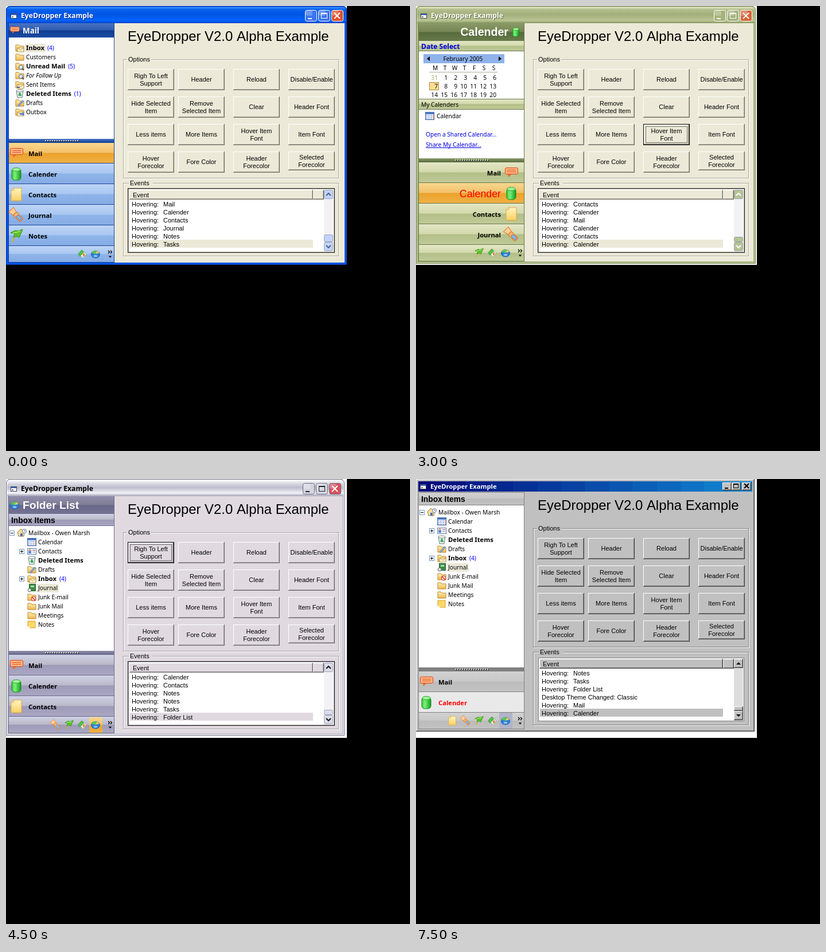
An HTML page with a canvas for the animation above (8 s loop, 704 by 777 pixels).

```html
<!DOCTYPE html>
<html lang="en">
<head>
<meta charset="utf-8">
<title>EyeDropper Example</title>
<style>
html, body { margin: 0; width: 100%; height: 100%; overflow: hidden; background: #000; }
canvas { display: block; }
</style>
</head>
<body>
<canvas id="stage" width="704" height="777"></canvas>
<script>
const ctx = document.getElementById('stage').getContext('2d');
const SANS = '"Liberation Sans", Arial, sans-serif';
const NOTO = '"Noto Sans", sans-serif';
const UI = '11px ' + SANS, LABEL = '10.2px ' + NOTO, BOLD = 'bold 11.2px ' + NOTO;
const ORANGE = ['#f8d88f', '#f3c06a', '#eba22c', '#f0b144'];

const THEMES = {
  blue: {
    w: 594, h: 452, face: '#ece9d8', border: '#0050e0', edge: '#0030b0', rim: '#1860ee', title: '#fff', shadow: '#0a2a90',
    bar: [0, '#0050dc', .07, '#3a93ff', .2, '#0860ec', .5, '#0054e3', .85, '#0264fc', 1, '#0040c8'],
    item: ['#bdd5f6', '#a9c7f0', '#8fb4ea', '#86ace4'], head: ['#4874c4', '#2f5cae', '#0e3d94', '#1a4ba2'],
    line: '#1c439c', box: '#3c74ec', boxEdge: '#fff', close: '#e0512d', glyph: '#fff',
    scroll: '#c3d3fb', arrow: '#4d6185', lo: '#aca899', dark: '#716f64'
  },
  olive: {
    w: 592, h: 450, face: '#ece9d8', border: '#a5b380', edge: '#71824e', rim: '#c4ce9e', title: '#fff', shadow: '#5c6c40',
    bar: [0, '#8c9c64', .07, '#e4e8c6', .2, '#b2be8c', .5, '#a2af7c', .85, '#bac494', 1, '#84955e'],
    item: ['#e3e7c6', '#d3d9ac', '#b3bf88', '#bfca98'], head: ['#8a9a68', '#748651', '#566a3c', '#677a4a'],
    line: '#65774a', box: '#a5b37c', boxEdge: '#fff', close: '#d8643a', glyph: '#fff',
    scroll: '#b5c491', arrow: '#fff', lo: '#aca899', dark: '#716f64'
  },
  silver: {
    w: 590, h: 448, face: '#e0dae0', border: '#c6c6d4', edge: '#727288', rim: '#fafafc', title: '#000', shadow: '',
    bar: [0, '#9a9aae', .07, '#fff', .25, '#dadae4', .5, '#bcbccc', .82, '#f2f2f8', 1, '#a2a2b6'],
    item: ['#cfd1e6', '#b9b9c8', '#9d9bb8', '#a9a7c2'], head: ['#9090ac', '#7e7d94', '#68678a', '#747392'],
    line: '#6c6b88', box: '#d4d4e0', boxEdge: '#6e6e86', close: '#d8505a', glyph: '#222',
    scroll: '#dcdce8', arrow: '#111', lo: '#a5a0a5', dark: '#6c686e'
  },
  classic: {
    w: 590, h: 441, face: '#c0c0c0', line: '#808080', title: '#fff',
    item: ['#d2d2d2', '#c8c8c8', '#bcbcbc', '#c2c2c2'], lo: '#808080', dark: '#404040', arrow: '#000'
  }
};

const STATES = [
  { end: 1500, theme: 'blue', header: 'Mail', headIcon: 'mail', headH: 25, headFont: 'bold 13.4px ' + NOTO, body: 'mail',
    items: ['Mail', 'Calender', 'Contacts', 'Journal', 'Notes'], sel: 'Mail', foot: ['house', 'globe'], thumb: 399,
    log: 'Mail,Calender,Contacts,Journal,Notes,Tasks' },
  { end: 3000, theme: 'blue', header: 'Calender', headIcon: 'cylinder', headH: 25, headFont: 'bold 14px ' + NOTO, rtl: true,
    sub: 'Date Select', subH: 19, body: 'calendar', mine: 161, items: ['Mail', 'Calender', 'Contacts', 'Journal'], sel: 'Calender',
    foot: ['flag', 'house', 'globe'], thumb: 401, log: 'Tasks,Mail,Mail,Calender,ItemSelected: Calender,Contacts' },
  { end: 4500, theme: 'olive', header: 'Calender', headIcon: 'cylinder', headH: 31, headFont: 'bold 19.6px ' + SANS, rtl: true,
    sub: 'Date Select', subH: 18, body: 'calendar', mine: 162, items: ['Mail', 'Calender', 'Contacts', 'Journal'], sel: 'Calender',
    selFont: '17.8px ' + SANS, foot: ['flag', 'house', 'globe'], focus: 10, thumb: 403,
    log: 'Contacts,Calender,Mail,Calender,Contacts,Calender' },
  { end: 6000, theme: 'silver', header: 'Folder List', headIcon: 'globe', headH: 31, headFont: 'bold 19.2px ' + SANS,
    sub: 'Inbox Items', subH: 21, body: 'tree', items: ['Mail', 'Calender', 'Contacts'], foot: ['journal', 'flag', 'house', 'globe'],
    hot: true, focus: 0, thumb: 403, log: 'Calender,Contacts,Notes,Notes,Tasks,Folder List' },
  { end: 7500, theme: 'silver', headH: 1, sub: 'Inbox Items', subH: 22, body: 'tree', items: [],
    foot: ['mail', 'cylinder', 'contacts', 'journal', 'flag', 'house', 'globe'], hot: true, focus: 1, thumb: 403,
    log: 'Mail,Contacts,Journal,Notes,Tasks,Folder List' },
  { end: 8000, theme: 'classic', headH: 1, sub: 'Inbox Items', subH: 22, body: 'tree', items: ['Mail', 'Calender'], sel: 'Calender',
    foot: ['contacts', 'journal', 'flag', 'house', 'globe'], hot: true, thumb: 404,
    log: 'Notes,Tasks,Folder List,Desktop Theme Changed: Classic,Mail,Calender' }
];

const BUTTONS = ['Righ To Left|Support', 'Header', 'Reload', 'Disable/Enable', 'Hide Selected|Item', 'Remove|Selected Item',
  'Clear', 'Header Font', 'Less items', 'More Items', 'Hover Item|Font', 'Item Font', 'Hover|Forecolor', 'Fore Color',
  'Header|Forecolor', 'Selected|Forecolor'];
const ITEM_ICONS = { Mail: 'mail', Calender: 'cylinder', Contacts: 'contacts', Journal: 'journal', Notes: 'flag' };

let theme;

function rect(x, y, w, h, fill) { ctx.fillStyle = fill; ctx.fillRect(x, y, w, h); }
function frame(x, y, w, h, color) { ctx.strokeStyle = color; ctx.lineWidth = 1; ctx.strokeRect(x + .5, y + .5, w - 1, h - 1); }
function text(s, x, y, font = UI, color = '#000', align = 'left') {
  ctx.font = font; ctx.fillStyle = color; ctx.textAlign = align;
  ctx.fillText(s, x, y);
}
function gradient(y, h, stops) {
  const g = ctx.createLinearGradient(0, y, 0, y + h);
  for (let i = 0; i < stops.length; i += 2) g.addColorStop(stops[i], stops[i + 1]);
  return g;
}
function band(x, y, w, h, [a, b, c, d]) { rect(x, y, w, h, gradient(y, h, [0, a, .48, b, .52, c, 1, d])); }
function path(pts) {
  ctx.beginPath();
  for (let i = 0; i < pts.length; i += 2) ctx.lineTo(pts[i], pts[i + 1]);
}
function paint(fill, stroke, width = 1) {
  if (fill) { ctx.fillStyle = fill; ctx.fill(); }
  if (stroke) { ctx.strokeStyle = stroke; ctx.lineWidth = width; ctx.stroke(); }
}
function poly(pts, fill, stroke) { path(pts); ctx.closePath(); paint(fill, stroke); }
function line(color, width, ...pts) { path(pts); paint(null, color, width); }
function round(x, y, w, h, r, fill, stroke) { ctx.beginPath(); ctx.roundRect(x, y, w, h, r); paint(fill, stroke); }
function oval(x, y, rx, ry, fill, stroke) { ctx.beginPath(); ctx.ellipse(x, y, rx, ry, 0, 0, Math.PI * 2); paint(fill, stroke); }
function raised(x, y, w, h) {
  rect(x, y, w, h, theme.dark);
  rect(x, y, w - 1, h - 1, '#fff');
  rect(x + 1, y + 1, w - 2, h - 2, theme.lo);
  rect(x + 1, y + 1, w - 3, h - 3, theme.face);
}
function arrow(x, y, dir, size, color) { poly([x - size, y - dir * size / 2, x + size, y - dir * size / 2, x, y + dir * size / 2], color); }

// Icons are drawn around their centre; the navigation set is about 22 px wide.
const ICONS = {
  mail() {
    round(-10.5, -8.5, 22, 11, 2, '#ffb27c', '#e0451a');
    poly([-6, 3, -5, 8, 0, 3], '#f06a30');
    line('#e0552a', 1, -7, -4.5, 8, -4.5); line('#e0552a', 1, -7, -1.5, 8, -1.5);
  },
  cylinder() {
    const g = ctx.createLinearGradient(-8, 0, 8, 0);
    g.addColorStop(0, '#3cc83c'); g.addColorStop(.35, '#7cf07a'); g.addColorStop(1, '#149a1c');
    round(-8, -10, 16, 21, [6, 6, 5, 5], g, '#128a1a');
    oval(0, -7.5, 7, 3, '#a4f49c', '#2cac34');
  },
  contacts() {
    poly([-9, -7, -4, -11, 9, -11, 9, 11, -9, 11], gradient(-11, 22, [0, '#fff6c4', 1, '#f8cf62']), '#e0a83c');
    poly([-9, -7, -4, -7, -4, -11], '#fffbe8', '#e0a83c');
  },
  journal() {
    ctx.rotate(.78);
    round(-4, -4, 17, 8, 2, '#ffb468', '#d46a20');
    poly([-13, -6, -4, -4, -4, 4, -13, 6], '#ffd098', '#e07a30');
    round(2, -2, 9, 4, 1, '#8cc4f4', '#4878c0');
  },
  flag() {
    line('#d8b020', 2.2, -7, 11, 0, -5);
    poly([-10, -5, -2, -9, 3, -8, 11, -11, 5, 3, 0, 1, -5, 3, -3, -4], '#5cc428', '#2c8c14');
    line('#b0ec70', 1.5, -6, -5, 1, -6, 7, -8);
  },
  house() {
    poly([-9, 0, -1, -10, 10, 0, 3, 11], '#e8f4e0', '#78a878');
    poly([-10, 0, -1, -10, 4, -4, -6, 6], '#52c048', '#2c9030');
    poly([1, 1, 5, -2, 7, 3, 3, 8], '#f07a48');
  },
  globe() {
    oval(0, 1, 11, 9, '#2c7cd4', '#1c58a8');
    poly([0, 0, -10, -2, -5, -8, 4, -8], '#5ec850');
    poly([0, 0, 4, -8, 10, -3], '#f4d060');
    oval(0, 5, 5, 2.5, '#88c8f8');
  },
  folder() {
    poly([-7, -5, -2, -5, 0, -3, 7, -3, 7, 6, -7, 6], gradient(-5, 11, [0, '#fff0b0', 1, '#eeb850']), '#b88430');
  },
  inbox() { ICONS.folder(); poly([-4, 0, 7, 0, 7, 7, -4, 7], '#fdf6d8', '#b89038'); line('#b89038', 1, -4, 0, 1.5, 4, 7, 0); },
  search() { ICONS.folder(); oval(2, 2, 3.5, 3.5, '#d8ecff', '#506080'); line('#404850', 2, 4, 4, 7, 7); },
  sent() { ICONS.inbox(); line('#3868c8', 2, -5, 5, 0, 5); },
  outbox() { ICONS.inbox(); poly([0, 2, 5, 2, 5, 0, 8, 4, 5, 7, 5, 5, 0, 5], '#4c80dc'); },
  draft() { ICONS.folder(); line('#4878c0', 3, -3, 6, 6, -4); line('#d8e8ff', 1, -3, 6, 6, -4); },
  bin() { poly([-6, -5, 6, -5, 4, 7, -4, 7], '#e4ece8', '#68807c'); oval(0, -5, 6, 2, '#fff', '#68807c'); line('#189838', 1.5, -2, 3, 0, -1, 2, 3, -2, 3); },
  grid() {
    rect(-8, -7, 16, 14, '#fff'); rect(-8, -7, 16, 4, '#4c78c8');
    for (let i = 0; i < 4; i++) for (let j = 0; j < 3; j++) rect(-7 + i * 4, -2 + j * 3, 3, 2, i === 3 ? '#e09080' : '#a0b8e4');
    frame(-8, -7, 16, 14, '#4868a8');
  },
  card() { rect(-8, -5, 16, 11, '#fff'); frame(-8, -5, 16, 11, '#5878b0'); rect(-6, -2, 5, 6, '#5888d8'); oval(-3.5, -2, 2, 2, '#e8a878'); line('#a04030', 1, 1, -1.5, 6, -1.5); line('#7890b8', 1, 1, 1.5, 6, 1.5); },
  book() { rect(-5, -7, 12, 13, '#3c8c48'); frame(-5, -7, 12, 13, '#245c30'); rect(-2, -4, 6, 3, '#a8dca8'); oval(-4, 4, 3, 3, '#eee', '#666'); },
  junk() { ICONS.folder(); oval(3, 3, 4, 4, '#ffe0d0', '#d83018'); line('#d83018', 1.5, 0, 0, 6, 6); },
  note() { poly([-7, -6, 6, -6, 6, 6, -3, 6, -7, 3], '#ffd868', '#d89c28'); poly([-7, 3, -3, 3, -3, 6], '#fff4c0'); },
  home() { poly([-8, -1, -2, -7, 4, -1, 3, 6, -6, 6], '#f4dca0', '#a07838'); oval(4, -3, 3.5, 3.5, '#fff', '#607090'); line('#607090', 1, 4, -5, 4, -3, 6, -3); rect(-3, 1, 4, 5, '#4870b8'); }
};
function icon(name, x, y, scale = 1) {
  ctx.save(); ctx.translate(x, y); ctx.scale(scale, scale);
  ICONS[name]();
  ctx.restore();
}

function titleIcon(x, y) { rect(x, y, 11, 9, '#fff'); rect(x + 1, y + 1, 9, 2, '#3868c0'); rect(x + 2, y + 5, 3, 2, '#777'); frame(x, y, 11, 9, '#445'); }

function captionGlyphs(xs, y, r, color, closeColor = color) {
  rect(xs[0] - r, y + r - 1, r + 2, 2, color);
  frame(xs[1] - r, y - r, r * 2 + 1, r * 2, color); rect(xs[1] - r, y - r, r * 2 + 1, 2, color);
  line(closeColor, 2, xs[2] - r, y - r, xs[2] + r, y + r); line(closeColor, 2, xs[2] + r, y - r, xs[2] - r, y + r);
}

function classicWindow() {
  const { w, h, face } = theme;
  raised(0, 0, w, h);
  const steps = 14;
  for (let i = 0; i < steps; i++) {
    const k = i / (steps - 1), mix = (a, b) => Math.round(a + (b - a) * k);
    rect(4 + i * 41.6, 4, 42, 18, `rgb(${mix(0, 16)},${mix(10, 132)},${mix(124, 208)})`);
  }
  rect(w - 4, 4, 2, 18, face);
  titleIcon(7, 9);
  text('EyeDropper Example', 25, 17, 'bold 11.2px ' + NOTO, '#fff');
  for (const x of [534, 550, 568]) raised(x, 6, 16, 14);
  captionGlyphs([542, 557, 576], 12, 4, '#000');
}

function xpWindow() {
  const { w, h } = theme, corners = [7, 7, 0, 0];
  round(0, 0, w, h, corners, theme.border);
  round(0, 0, w, 30, corners, gradient(0, 30, theme.bar));
  round(1.5, 1.5, w - 3, h - 3, corners, null, theme.rim);
  round(.5, .5, w - 1, h - 1, corners, null, theme.edge);
  rect(4, 30, w - 8, h - 34, theme.face);
  titleIcon(8, 13);
  const font = 'bold 12.2px "Open Sans", sans-serif';
  if (theme.shadow) text('EyeDropper Example', 27, 22, font, theme.shadow);
  text('EyeDropper Example', 26, 21, font, theme.title);
  const xs = [w - 63, w - 40, w - 17];
  xs.forEach((x, i) => {
    round(x - 9.5, 7.5, 20, 19, 3, i === 2 ? theme.close : theme.box, theme.boxEdge);
    ctx.globalAlpha = .25;
    round(x - 9, 8, 12, 9, 3, '#fff');
    ctx.globalAlpha = 1;
  });
  captionGlyphs(xs, 17, 5, theme.glyph, '#fff');
}

function group(label, x, y, h) {
  frame(205, y + 1, 376, h, '#fff');
  frame(204, y, 376, h, theme.lo);
  rect(x - 2, y - 4, 42, 10, theme.face);
  text(label, x, y + 4);
}

function button(i, focused) {
  const x = [212, 300, 396, 492][i % 4], y = 110 + 48 * Math.floor(i / 4), h = i === 15 ? 33 : 37;
  if (focused) {
    rect(x, y, 81, h, '#000');
    raised(x + 1, y + 1, 79, h - 2);
    ctx.setLineDash([1, 1]); frame(x + 4, y + 4, 73, h - 8, '#000'); ctx.setLineDash([]);
  } else raised(x, y, 81, h);
  const lines = BUTTONS[i].split('|');
  lines.forEach((s, k) => text(s, x + 40.5, y + h / 2 + 3.5 + (k - (lines.length - 1) / 2) * 13, UI, '#000', 'center'));
}

function scrollButton(y, dir) {
  if (theme === THEMES.classic) {
    raised(554, y, 16, 16);
    arrow(562, y + 8, dir, 4, theme.arrow);
  } else {
    round(554.5, y + .5, 15, 15, 2, theme.scroll, '#98a4b8');
    line(theme.arrow, 2, 558, y + 8 - dir * 2, 562, y + 8 + dir * 2, 566, y + 8 - dir * 2);
  }
}

function eventList(state) {
  const classic = theme === THEMES.classic;
  frame(212, 318, 361, 113, classic ? theme.face : '#222');
  frame(213, 319, 359, 111, theme.lo);
  rect(214, 320, 357, 109, '#fff');
  raised(215, 321, 320, 17); raised(535, 321, 19, 17);
  text('Event', 221, 334);
  rect(216, 408, 319, 14, theme.face);
  state.log.split(',').forEach((s, i) => {
    const y = 350 + 14 * i, custom = s.includes(':');
    text(custom ? s : 'Hovering:', 219, y);
    if (!custom) text(s, 274, y);
  });
  rect(554, 321, 16, 108, classic ? '#dcdcdc' : '#f2f1f4');
  scrollButton(321, -1); scrollButton(412, 1);
  if (classic) raised(554, state.thumb, 16, 8);
  else round(554.5, state.thumb + .5, 15, 411 - state.thumb, 2, theme.scroll, '#98a4b8');
}

function label(s, x, y, opt = {}) {
  const font = opt.bold ? BOLD : (opt.italic ? 'italic ' : '') + LABEL;
  ctx.font = font;
  const w = ctx.measureText(s).width;
  if (opt.mark) rect(x - 2, y - 7, w + 4, 15, '#ece9d8');
  text(s, x, y + 4, font, opt.color);
  if (opt.count) text(`(${opt.count})`, x + w + 5, y + 4, LABEL, '#0000ff');
  return w;
}

function mailBody() {
  const rows = [
    ['inbox', 'Inbox', { bold: 1, mark: 1, count: 4 }], ['folder', 'Customers'], ['search', 'Unread Mail', { bold: 1, count: 5 }],
    ['search', 'For Follow Up', { italic: 1 }], ['sent', 'Sent Items'], ['bin', 'Deleted Items', { bold: 1, count: 1 }],
    ['draft', 'Drafts'], ['outbox', 'Outbox']
  ];
  rows.forEach(([ic, s, opt], i) => { icon(ic, 24, 73 + 16 * i); label(s, 35, 73 + 16 * i, opt); });
}

function expander(x, y, open) {
  rect(x - 4, y - 4, 9, 9, '#fff'); frame(x - 4, y - 4, 9, 9, '#7898b8');
  rect(x - 2, y, 5, 1, '#000');
  if (!open) rect(x, y - 2, 1, 5, '#000');
}

function treeBody(top) {
  const y0 = top + 12;
  expander(10, y0, true); icon('home', 28, y0); label('Mailbox - Owen Marsh', 39, y0);
  const rows = [
    ['grid', 'Calendar'], ['card', 'Contacts', { more: 1 }], ['bin', 'Deleted Items', { bold: 1 }], ['draft', 'Drafts'],
    ['inbox', 'Inbox', { bold: 1, count: 4, more: 1 }], ['book', 'Journal', { mark: 1 }], ['junk', 'Junk E-mail'],
    ['folder', 'Junk Mail'], ['folder', 'Meetings'], ['note', 'Notes']
  ];
  rows.forEach(([ic, s, opt = {}], i) => {
    const y = y0 + 16 * (i + 1);
    if (opt.more) expander(27, y);
    icon(ic, 45, y); label(s, 56, y, opt);
  });
}

function calendarBody(top, mine) {
  const y = top + 13;
  rect(13, y - 8, 141, 16, '#8fb2ea');
  text('February 2005', 82, y + 4, LABEL, '#000', 'center');
  poly([24, y - 4, 24, y + 4, 19, y], '#000'); poly([144, y - 4, 144, y + 4, 149, y], '#000');
  [...'MTWTFSS'].forEach((d, i) => text(d, 33.5 + 17 * i, y + 20, LABEL, '#000', 'center'));
  rect(23, y + 23, 119, 1, '#aca899');
  rect(23, y + 41, 17, 14, '#fbdd94'); frame(23, y + 41, 17, 14, '#b08438');
  for (let i = 0; i < 21; i++) {
    text(i || '31', 38 + 17 * (i % 7), y + 37 + 15 * Math.floor(i / 7), LABEL, i ? '#000' : '#aca878', 'right');
  }
  band(5, mine, 183, 18, theme.item);
  rect(5, mine, 183, 1, theme.line); rect(5, mine + 18, 183, 1, theme.line);
  label('My Calenders', 9, mine + 10);
  icon('grid', 24, mine + 30); label('Calendar', 36, mine + 30);
  label('Open a Shared Calendar...', 17, mine + 62, { color: '#0000e0' });
  const w = label('Share My Calendar...', 17, mine + 80, { color: '#0000e0' });
  rect(17, mine + 85, w, 1, '#0000e0');
}

function header(state, y) {
  const h = state.headH, base = y + h / 2 + (h > 25 ? 6.5 : 5.5);
  band(5, y, 183, h, theme.head);
  text(state.header, state.rtl ? 161 : 29, base, state.headFont, '#fff', state.rtl ? 'right' : 'left');
  icon(state.headIcon, state.rtl ? 174 : 15, y + h / 2, .7);
}

function navItem(state, name, y) {
  const selected = name === state.sel, classic = theme === THEMES.classic;
  if (selected && classic) rect(5, y, 183, 35, '#e9e9e9');
  else band(5, y, 183, 35, selected ? ORANGE : theme.item);
  rect(5, y + 35, 183, 1, theme.line);
  const red = selected && (state.selFont || classic);
  const font = selected && state.selFont || BOLD;
  text(name, state.rtl ? 148 : 39, y + (font === BOLD ? 22.5 : 24.5), font, red ? '#ff0000' : '#000', state.rtl ? 'right' : 'left');
  icon(ITEM_ICONS[name], state.rtl ? 166 : 18, y + 18);
}

function footer(state, y, bottom) {
  const h = bottom - 1 - y, mid = bottom - 15;
  band(5, y, 183, h, theme.item);
  if (state.hot) {
    if (theme === THEMES.classic) rect(145, y, 23, h, '#b0b4c8');
    else band(145, y + 1, 23, h - 1, ORANGE);
  }
  const n = state.foot.length;
  state.foot.forEach((name, i) => icon(name, 156 - 23.2 * (n - 1 - i), mid, .7));
  for (const x of [178, 182]) line('#000', 1.3, x, mid - 6, x + 2.5, mid - 3.5, x, mid - 1);
  arrow(181.5, mid + 5, 1, 2.8, '#000');
}

function sidebar(state) {
  const top = theme === THEMES.classic ? 23 : 30, bottom = theme.h - 4;
  rect(4, top, 185, bottom - top, theme.line);
  rect(5, top + 1, 183, bottom - top - 2, '#fff');
  if (state.header) header(state, top);
  let y = top + state.headH;
  if (state.sub) {
    const dates = state.body === 'calendar';
    band(5, y, 183, state.subH - 1, theme.item);
    rect(5, y + state.subH - 1, 183, 1, theme.line);
    text(state.sub, 9, y + state.subH / 2 + (dates ? 4.5 : 5), dates ? 'bold 12px ' + NOTO : 'bold 13.8px ' + SANS, dates ? '#0000e8' : '#000');
    y += state.subH;
  }
  if (state.body === 'mail') mailBody();
  if (state.body === 'tree') treeBody(y);
  if (state.body === 'calendar') calendarBody(y, state.mine);

  // With no items left the footer grows up to the splitter.
  const rows = 36 * state.items.length, nav = bottom - 29 - (rows || 2);
  rect(5, nav - 7, 183, 7, theme.head ? gradient(nav - 7, 7, [0, theme.head[0], 1, theme.head[2]]) : '#808080');
  for (let x = 68; x < 128; x += 4) { rect(x + 1, nav - 4, 2, 2, '#222'); rect(x, nav - 5, 2, 2, '#ddd'); }
  state.items.forEach((name, i) => navItem(state, name, nav + 36 * i));
  footer(state, nav + rows, bottom);
}

function draw(state) {
  theme = THEMES[state.theme];
  const classic = theme === THEMES.classic;
  rect(0, 0, 704, 777, '#000');
  rect(0, 0, 594, 452, '#fff');
  classic ? classicWindow() : xpWindow();
  sidebar(state);
  ctx.save();
  if (classic) ctx.translate(0, -7);
  text('EyeDropper V2.0 Alpha Example', 212, 61, '23.9px ' + SANS);
  group('Options', 213, 93, 208);
  group('Events', 216, 309, 128);
  BUTTONS.forEach((_, i) => button(i, i === state.focus));
  eventList(state);
  ctx.restore();
}

const start = performance.now();
function tick() {
  const t = (performance.now() - start) % 8000;
  draw(STATES.find(s => t < s.end));
  requestAnimationFrame(tick);
}
tick();
</script>
</body>
</html>
```
